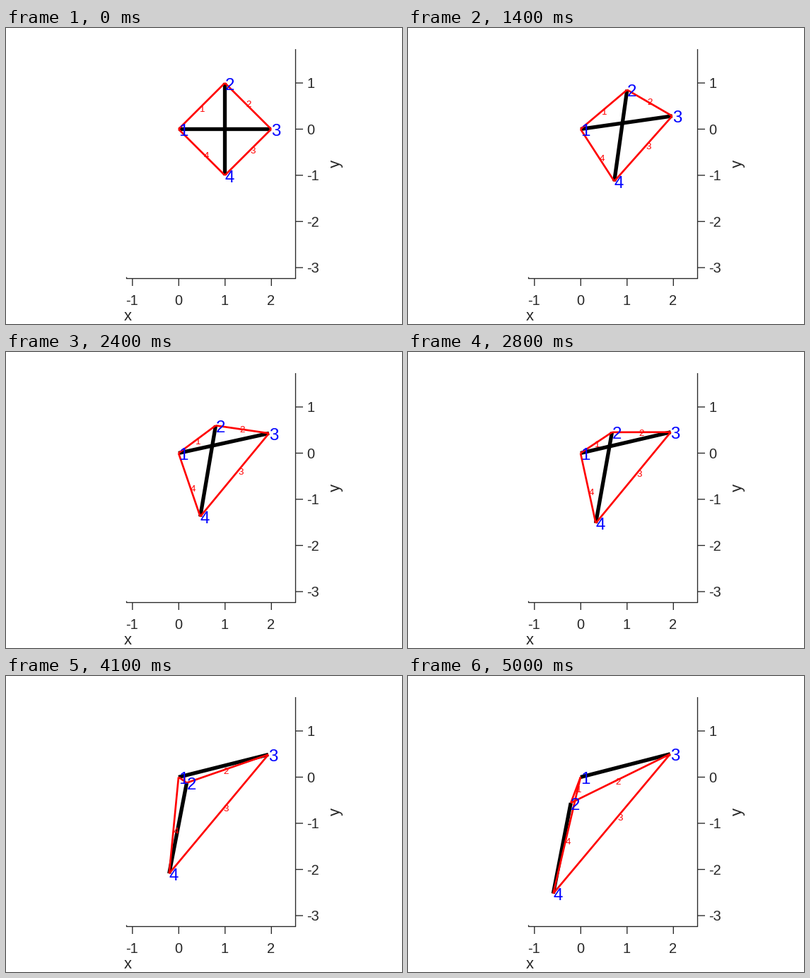
These frames come from a looping animation (560x420 px, 5.1 s). A matplotlib script:

```python
import numpy as np
import matplotlib.pyplot as plt
from matplotlib.animation import FuncAnimation

W, H, DPI = 560, 420, 100
FRAMES, INTERVAL = 51, 100
PT = 72 / DPI                      # points per pixel
X0, Y0, UNIT = 244.0, 143.5, 65.5  # plot origin and scale in pixels
INK = "#262626"

# Pose of the two rigid bars (length 2) at a few key steps
KEYS = np.array([0, 8, 19, 28, 35, 41, 50])
CENTER_X = np.array([1, 0.943, 0.771, 0.504, 0.232, -0.013, -0.400])
CENTER_Y = np.array([0, -0.061, -0.240, -0.532, -0.829, -1.105, -1.540])
TILT = np.array([0, 6.1, 8.7, 10.1, 10.4, 10.9, 10.95])
SWING = np.array([0, 4.37, 10.9, 13.15, 13.8, 14.15, 14.5])

CABLES = [(0, 1), (1, 2), (2, 3), (3, 0)]
BARS = [(0, 2), (1, 3)]

plt.rcParams["font.family"] = "Liberation Sans"
fig = plt.figure(figsize=(W / DPI, H / DPI), dpi=DPI, facecolor="white")
ax = fig.add_axes([0, 0, 1, 1])
ax.set(xlim=(0, W), ylim=(H, 0))
ax.axis("off")


def line(xs, ys, color, px, z=1):
    return ax.plot(xs, ys, color=color, lw=px * PT, zorder=z, snap=False,
                   solid_capstyle="butt")[0]


def label(x, y, s, px, color=INK, **kw):
    return ax.text(x, y, s, fontsize=px * PT, color=color, va="baseline",
                   zorder=5, **kw)


def to_px(p):
    return X0 + UNIT * p[0], Y0 - UNIT * p[1]


def smooth(values, t):
    """Cubic Hermite curve through the key values."""
    slopes = np.gradient(values, KEYS, edge_order=2)
    i = min(np.searchsorted(KEYS, t, side="right") - 1, len(KEYS) - 2)
    h = KEYS[i + 1] - KEYS[i]
    u = (t - KEYS[i]) / h
    return ((1 + 2 * u) * (1 - u) ** 2 * values[i]
            + u * (1 - u) ** 2 * h * slopes[i]
            + u * u * (3 - 2 * u) * values[i + 1]
            + u * u * (u - 1) * h * slopes[i + 1])


def nodes(t):
    swing = np.radians(smooth(SWING, t))
    tilt = np.radians(smooth(TILT, t))
    center = np.array([smooth(CENTER_X, t), smooth(CENTER_Y, t)])
    half = np.array([np.sin(tilt), np.cos(tilt)])
    tip = 2 * np.array([np.cos(swing), np.sin(swing)])
    return [np.zeros(2), center + half, tip, center - half]


def draw_axes():
    line([409.5, 409.5], [30, 356], INK, 1.33)
    line([170, 410], [355.5, 355.5], INK, 1.33)
    line([170.5, 170.5], [353.5, 355.5], INK, 1.33)
    for v in range(-1, 3):
        x = X0 + UNIT * v + 0.3
        line([x, x], [355.5, 366], INK, 1.33)
        label(x - 0.8, 393, str(v), 20, ha="center")
    for v in range(-3, 2):
        y = Y0 - UNIT * v
        line([409.5, 420], [y, y], INK, 1.33)
        label(425.6, y + 7.4, str(v), 20)
    label(172, 415, "x", 22, ha="center")
    ax.text(466.5, 192.2, "y", fontsize=22 * PT, color=INK, rotation=90,
            ha="center", va="center")


draw_axes()
bars = [line([], [], "black", 5.33, 2) for _ in BARS]
cables = [line([], [], "red", 2.67, 3) for _ in CABLES]
cable_tags = [label(0, 0, str(i + 1), 13.33, "red") for i in range(4)]
node_tags = [label(0, 0, str(i + 1), 24, "blue") for i in range(4)]


def update(t):
    pts = nodes(t)
    for artists, pairs in ((bars, BARS), (cables, CABLES)):
        for art, (a, b) in zip(artists, pairs):
            art.set_data(*zip(to_px(pts[a]), to_px(pts[b])))
    for tag, (a, b) in zip(cable_tags, CABLES):
        x, y = to_px(0.55 * pts[a] + 0.45 * pts[b])
        tag.set_position((x, y + 5))
    for tag, p in zip(node_tags, pts):
        x, y = to_px(p)
        tag.set_position((x, y + 9.6))
    return bars + cables + cable_tags + node_tags


anim = FuncAnimation(fig, update, frames=FRAMES, interval=INTERVAL,
                     init_func=lambda: update(0), repeat=True, repeat_delay=0)
plt.show()
```
